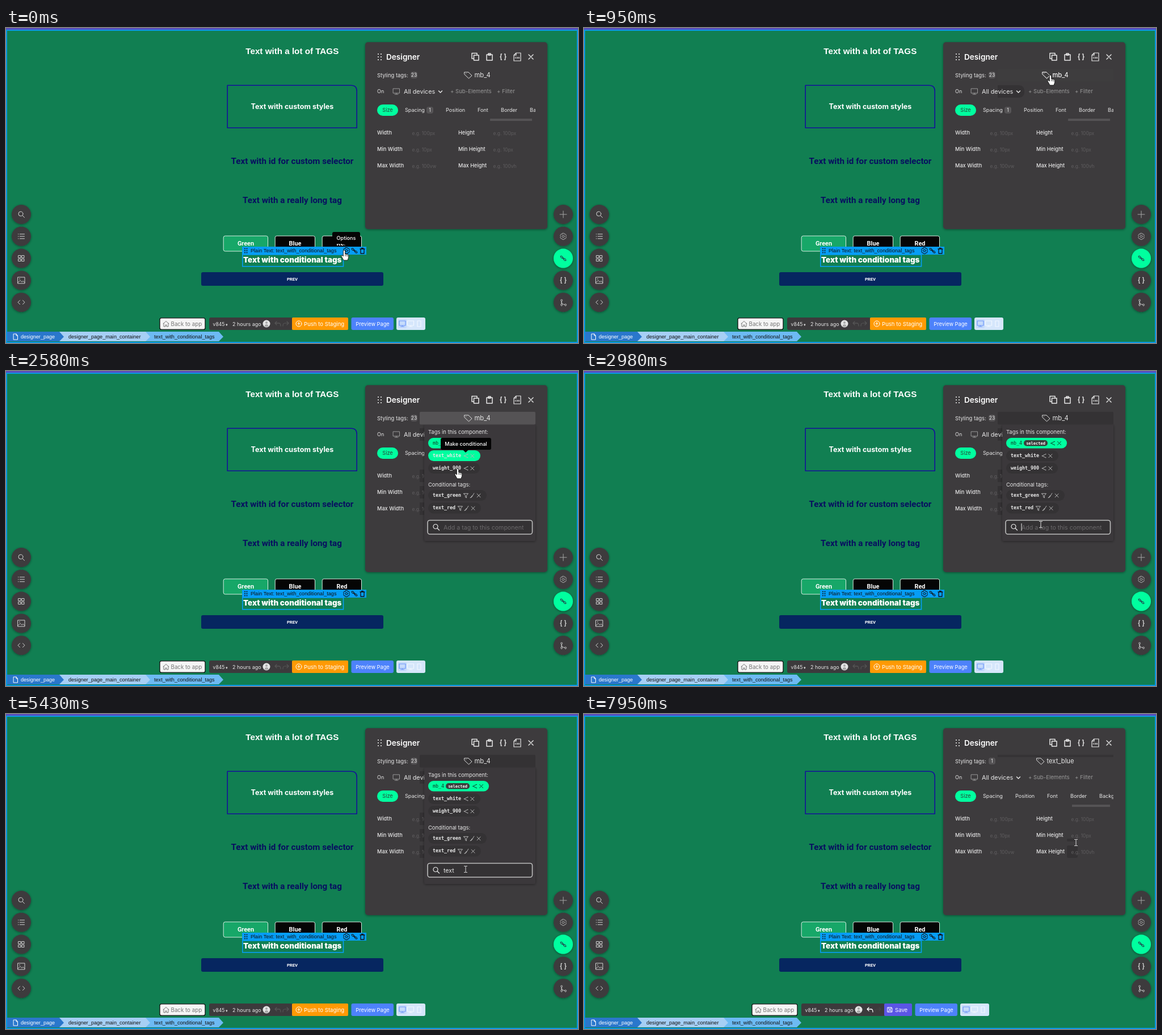
Animation, 1008 px wide and 556 px high, one loop 8 s. Source, as an HTML page:

```html
<!DOCTYPE html>
<html lang="en">
<head>
<meta charset="utf-8">
<style>
  html, body { margin: 0; width: 100%; height: 100%; overflow: hidden; background: #117f52; }
  svg { display: block; }
  text { font-family: Inter, sans-serif; white-space: pre; }
  .arial { font-family: "Liberation Sans", Arial, sans-serif; }
  .roboto { font-family: Roboto, sans-serif; font-weight: 700; }
  .mono { font-family: "DejaVu Sans Mono", monospace; font-weight: 700; }
  .medium { font-weight: 500; }
  .semi { font-weight: 600; }
  .bold { font-weight: 700; }
  .black { font-weight: 900; }
  .mid { text-anchor: middle; }
</style>
</head>
<body>
<svg id="stage" width="1008" height="556" viewBox="0 0 1008 556"></svg>
<script>
const LOOP = 8000;
const ACCENT = '#00ff9f', PANEL = '#3c3a3c', DARK = '#343234', PALE = '#e8e8e8', SELECT = '#069df6', ON_ACCENT = '#0c3b29';

// Markup helpers
const text = (x, y, str, size, fill = '#fff', cls = '') =>
  `<text x="${x}" y="${y}" font-size="${size}" fill="${fill}" class="${cls}">${str}</text>`;
const rect = (x, y, w, h, fill, r = 0, extra = '') =>
  `<rect x="${x}" y="${y}" width="${w}" height="${h}" rx="${r}" fill="${fill}" ${extra}/>`;
const circle = (x, y, r, fill, extra = '') => `<circle cx="${x}" cy="${y}" r="${r}" fill="${fill}" ${extra}/>`;
const line = (x, y, d, color = PALE, w = 1) =>
  `<path transform="translate(${x} ${y})" d="${d}" fill="none" stroke="${color}" stroke-width="${w}" stroke-linejoin="round" stroke-linecap="round"/>`;
const group = (id, ...parts) => `<g id="${id}">${parts.join('')}</g>`;
const dots = (x, y, gap, r, fill) => [0, 1, 2, 3, 4, 5].map(i =>
  circle(x + (i % 2) * gap, y + (i >> 1) * gap, r, fill)).join('');

// Icons, centred on 0,0
const icon = {
  close: 'M-3-3L3 3M3-3L-3 3',
  search: 'M3-1A4 4 0 1 1-5-1A4 4 0 1 1 3-1M2 2L5.5 5.5',
  list: 'M-5.5-4h.5M-2.5-4h8M-5.5 0h.5M-2.5 0h8M-5.5 4h.5M-2.5 4h8',
  grid: 'M-5-5h4v4h-4zM1-5h4v4h-4zM-5 1h4v4h-4zM1 1h4v4h-4z',
  image: 'M-6-5.500H6V5.500H-6zM-6 4L-2 0L1 3L3 1L6 4M-3.500-2.500h1',
  code: 'M-2.500-3.500L-6 0L-2.500 3.500M2.500-3.500L6 0L2.500 3.500',
  plus: 'M-6 0H6M0-6V6',
  gear: 'M-1.500-5.500h3l.6 1.700l1.800-.3l1.500 2.600L4.300 0l1.100 1.500l-1.500 2.600l-1.800-.3l-.6 1.700h-3l-.6-1.700l-1.800.3l-1.500-2.600L-4.300 0l-1.100-1.500l1.500-2.600l1.800.3zM2 0A2 2 0 1 1-2 0A2 2 0 1 1 2 0',
  link: 'M-1 0L-4-1L-5-4L-2-4L0-1zM1 0L4 1L5 4L2 4L0 1zM-2-2L2 2',
  braces: 'M-2.500-5H-3.700V-1.200L-5 0L-3.700 1.200V5H-2.500M2.500-5H3.700V-1.200L5 0L3.700 1.200V5H2.500',
  branch: 'M-3-2V3M-3-2A1.500 1.500 0 1 1-2.900-2M-3 6A1.500 1.500 0 1 1-2.900 6M4 6A1.500 1.500 0 1 1 4.100 6M-3 0Q-2 4 2.500 4',
  trash: 'M-4-3.500H4M-1.500-5h3M-3-3.500V4.500H3V-3.500',
  copy: 'M-2.500-3H6V6H-2.500zM-2.500 3H-6V-6.500H3V-3',
  paste: 'M-5-4H5V6H-5zM-2-6H2V-3H-2z',
  file: 'M-2-7H6V7H-6V-3zM-2-7V-3H-6',
  tag: 'M-6-5H1L7 1L1.500 6L-6-1zM-3.500-2.500h.1',
  screen: 'M-5.500-5H5.500V3H-5.500zM0 3V5M-3 5H3',
  down: 'M-3-1.500L0 1.500L3-1.500',
  share: 'M3-3L-3 0L3 3M-3 0h-.5M3-3h.5M3 3h.5',
  filter: 'M-4-3.500H4L1 0V4L-1 3V0z',
  brush: 'M3-4L0 1M0 1Q-1 4-4 4Q-1 3-1 1z',
  home: 'M-5 0L0-4.500L5 0M-4-1V5H-1V2H1V5H4V-1',
  undo: 'M-2-4L-5-1L-2 2M-5-1H2Q5-1 5 4',
  disk: 'M-4-4H3L4-3V4H-4zM-2-4V-1H2V-4M-2 4V1H2V4',
  up: 'M5 0A5 5 0 1 1-5 0A5 5 0 1 1 5 0M0 2.500V-2M-2 0L0-2L2 0',
  doc: 'M-3.500-5H1L3.500-2V5H-3.500zM1-5V-2H3.500',
};

function page() {
  const button = (x, w, label, fill) =>
    rect(x + .2, 367, w - .7, 27, fill, 3, 'stroke="#d7eee1"') + text(x + w / 2, 384, label, 10.9, '#fff', 'roboto mid');
  const side = (x, icons, active) => icons.map((name, i) => {
    const y = 329 + i * 38.8, color = i === active ? '#234' : name === 'plus' || name === 'gear' ? '#a5a5a5' : '#d4d4d4';
    return circle(x, y, 17, i === active ? ACCENT : PANEL, 'filter="url(#soft)"') +
      line(x, y, icon[name], color, name === 'braces' ? 1.3 : 1);
  }).join('');
  const crumb = (x, end, fill) => `<path d="M${x} 536H${end - 8}L${end} 545L${end - 8} 553H${x}z" fill="${fill}"/>`;
  const navy = '#080f60';
  return rect(0, 0, 1008, 556, '#117f52') +
    rect(1, 4, 1006, 551, 'none', 0, 'stroke="#0b98e6" stroke-width="2"') + rect(0, 0, 1008, 3, '#594fbd') +
    text(504.3, 46, 'Text with a lot of TAGS', 15.2, '#fff', 'arial bold mid') +
    line(390.2, 101.2, 'M0 0H218Q228 0 228 10V75H0z', '#14109a', 1.6) +
    text(504.5, 142.7, 'Text with custom styles', 12.6, '#fff', 'bold mid') +
    text(504.5, 239.5, 'Text with id for custom selector', 15.2, navy, 'roboto mid') +
    text(504.5, 308.5, 'Text with a really long tag', 15.2, navy, 'roboto mid') +
    button(383, 79, 'Green', '#17a768') + button(474, 71, 'Blue', '#050505') + button(557, 70, 'Red', '#050505') +
    rect(344, 431, 321, 24, '#062660', 3) + text(504.5, 446, 'PREV', 7.7, '#fff', 'roboto mid') +
    rect(416.8, 400, 177.7, 20.8, 'none', 0, `stroke="${SELECT}" stroke-width="1.6"`) + rect(416, 386, 219, 14, SELECT) +
    text(504.7, 414, 'Text with conditional tags', 13.4, '#fff', 'black mid') +
    dots(421, 389.5, 3.5, 1, '#111') + text(431, 396, 'Plain Text: text_with_conditional_tags', 9.15, '#111', 'arial') +
    line(600, 393, icon.gear, '#111') + line(614, 393, icon.link, '#111') + line(628, 393.5, icon.trash, '#111', 1.3) +
    side(27, ['search', 'list', 'grid', 'image', 'code']) +
    side(982, ['plus', 'gear', 'link', 'braces', 'branch'], 2) +
    crumb(2, 383, '#6dbaf3') + crumb(2, 254, '#a6cff5') + crumb(2, 102, '#2a77cc') +
    line(17, 545, icon.doc, '#fff') + text(26, 548, 'designer_page', 9.1, '#fff', 'arial') +
    text(110, 548, 'designer_page_main_container', 9.1, '#111', 'arial') +
    text(261, 548, 'text_with_conditional_tags', 9.1, '#111', 'arial');
}

// Bottom bar; "edited" offers saving instead of pushing
function bottomBar(id, x, edited) {
  const action = x + 233, actionWidth = edited ? 49 : 99, preview = action + actionWidth + 5.5, devices = preview + 79.5;
  return group(id,
    rect(x, 511.8, 80, 20.4, '#f5f5f5', 3, 'stroke="#111" stroke-width="1.3"'), line(x + 11, 522, icon.home, '#777'),
    text(x + 19.5, 525.5, 'Back to app', 9.75, '#777'),
    rect(x + 87, 511, 147, 22, PANEL, 3), text(x + 93.5, 525.5, 'v845', 8.7, PALE), line(x + 118, 524, 'M-1-1H1L0 1z', PALE),
    text(x + 128, 525.5, '2 hours ago', 9, PALE),
    circle(x + 188, 522, 6.5, '#e4e4e4'), circle(x + 188, 520, 2, '#a8a8a8'),
    `<path transform="translate(${x + 188} 527)" d="M-3.500-.5Q-3-4 0-4Q3-4 3.500-.5Q0 1.500-3.500-.5" fill="#a8a8a8"/>`,
    line(x + 208, 522, icon.undo, edited ? '#fff' : '#555', 1.3),
    `<g transform="translate(${x + 222} 522) scale(-1 1)">${line(0, 0, icon.undo, edited ? '#444' : '#555', 1.2)}</g>`,
    rect(action, 511, actionWidth, 22, edited ? '#5b55e6' : '#ff9a05', 2),
    line(action + (edited ? 10 : 12), 522, edited ? icon.disk : icon.up, '#fff'),
    text(action + (edited ? 19 : 21), 525.5, edited ? 'Save' : 'Push to Staging', 9.6),
    rect(preview, 511, 74.5, 22, '#4d82fb', 3), text(preview + 37.5, 525.5, 'Preview Page', 9.25, '#fff', 'mid'),
    rect(devices, 511, 51, 22, '#d5e6fb', 3), rect(devices + 3, 514, 15, 16, '#c6dbfb', 2),
    line(devices + 10.5, 522, icon.screen, '#6e97f8', 1.2),
    line(devices + 25, 522, icon.screen, '#f2f7ff', 1.2), line(devices + 40, 522, 'M-3-5H3V5H-3z', '#f2f7ff', 1.2));
}

const tagLabel = (x, name) => line(x, 83, icon.tag, '#ddd') + text(x + 11.5, 87, name, 11.2, PALE);

function panel() {
  const field = (x, y, label, hint) =>
    text(x, y, label, 9.2, PALE, 'medium') + text(x + 61.5, y + .5, hint, 8.4, '#5f5d5f');
  const badge = (x, y, n) => rect(x - 6, y - 6, 12, 12, '#565456', 4) + text(x, y + 3, n, 8.4, PALE, 'mid');
  const tabs = xs => ['Spacing', 'Position', 'Font', 'Border', 'Background'].map((name, i) =>
    text(xs[i], 148, name, 9.1, PALE)).join('');
  return rect(633, 25, 321, 330, PANEL, 5, 'filter="url(#soft)"') +
    dots(656, 46, 5, 1.1, PALE) + text(670, 56, 'Designer', 13.6, '#fff', 'semi') +
    line(827, 51, icon.copy, PALE, 1.5) + line(852, 51, icon.paste, PALE, 1.5) + line(876, 51, icon.braces, PALE, 1.4) +
    line(901, 51, icon.file, PALE, 1.2) + text(901, 54, 'css', 5, PALE, 'mid bold') +
    line(925, 51, 'M-4-4L4 4M4-4L-4 4', PALE, 1.4) +
    text(654, 86.5, 'Styling tags:', 9.35, PALE) + text(654, 115, 'On', 9, PALE) +
    group('hoverPill', `<path d="M729 101H765Q776 101 776 112Q776 123 765 123H729z" fill="${DARK}"/>`) +
    line(688, 112, icon.screen, '#999') + text(701, 116, 'All devices', 10.8, PALE) + line(765.5, 112.5, icon.down, PALE, 1.5) +
    text(783, 115, '+ Sub-Elements', 9.6, '#999') + text(865, 115, '+ Filter', 9.6, '#999') +
    rect(654, 135, 37, 20, ACCENT, 10) + text(672.5, 148, 'Size', 9.2, '#284238', 'mid') +
    group('inputEdges', ...[174, 203, 232].map(y => rect(729, y, 8, 22, DARK))) +
    field(654, 188, 'Width', 'e.g. 100px') + field(797, 188, 'Height', 'e.g. 100px') +
    field(654, 217, 'Min Width', 'e.g. 10px') + field(797, 217, 'Min Height', 'e.g. 10px') +
    group('inputHover', rect(851, 220, 18, 5, DARK, 2), rect(851, 232, 19, 22, DARK, 3)) +
    field(654, 246, 'Max Width', 'e.g. 100vw') + field(797, 246, 'Max Height', 'e.g. 100vh') +
    group('before', badge(719, 83, '23'), tagLabel(814, 'mb_4'), badge(747, 145, '1'),
      `<g clip-path="url(#tabClip)">${tabs([703, 775, 831, 872, 923])}</g>`, rect(853, 160, 74, 4, '#555355')) +
    group('after', badge(719, 83, '1'), tagLabel(804, 'text_blue'), rect(729, 72, 204, 4, '#353335'),
      `<g clip-path="url(#tabClip)">${tabs([703, 760, 816, 857, 908])}</g>`, rect(860, 160, 67, 4, '#555355'));
}

function dropdown() {
  const pill = (y, name, width, icons) => {
    const end = 752 + name.length * 5 + 8.5;
    return rect(744, y - 9.500, width, 19, DARK, 9.5, `id="${name}"`) + text(752, y + 2.3, name, 8.3, PALE, 'mono') +
      icons.map((k, i) => line(end + i * 11.300, y + .3, icon[k], '#b5b5b5')).join('');
  };
  return group('dropdown',
    rect(737, 94, 196, 206, '#3a383a', 3, 'filter="url(#soft)"'),
    text(744, 111, 'Tags in this component:', 9.4, PALE),
    rect(744, 118, 107, 18.5, ACCENT, 9.2), text(752, 130, 'mb_4', 8.3, ON_ACCENT, 'mono').replace('<text', '<text style="font-weight:400"'),
    rect(775, 122, 42, 10.5, '#3a3f3d', 5), text(796, 129.8, 'selected', 7, '#fff', 'mono mid'),
    line(826, 127.5, icon.share, ON_ACCENT), line(837.5, 127.5, icon.close, ON_ACCENT),
    pill(149.5, 'text_white', 92, ['share', 'close']), pill(171.5, 'weight_900', 91, ['share', 'close']),
    text(744, 204, 'Conditional tags:', 9.35, PALE),
    pill(219.5, 'text_green', 103, ['filter', 'brush', 'close']), pill(242, 'text_red', 93, ['filter', 'brush', 'close']),
    rect(743, 263.5, 184.5, 24.5, DARK, 4, 'stroke="#bdbdbd" stroke-width="1.600"'), line(758, 275.5, icon.search, PALE, 1.2),
    text(771, 279.5, 'Add a tag to this component', 10.6, '#6b696b').replace('<text', '<text id="hint"'),
    text(771, 279.5, '', 10.6, PALE).replace('<text', '<text id="typed"'),
    '<rect id="caret" y="269" width="1" height="13" fill="#eee"/>');
}

const tooltip = (id, x, y, w, label, tip) => group(id, rect(x, y, w, 21, '#050505', 3),
  `<path d="M${tip - 5} ${y + 21}h10l-5 5z" fill="#050505"/>`, text(x + w / 2, y + 13.8, label, 9.15, '#fff', 'medium mid'));

document.getElementById('stage').innerHTML =
  `<defs><filter id="soft" x="-20%" y="-20%" width="140%" height="140%"><feDropShadow dx="0" dy="1" stdDeviation="2" flood-opacity=".4"/></filter>
  <clipPath id="tabClip"><rect x="690" y="130" width="243" height="30"/></clipPath></defs>` +
  page() + bottomBar('pushBar', 271, false) + bottomBar('saveBar', 296, true) + panel() + dropdown() +
  group('row', rect(729, 72, 204, 22.5, DARK, 2, 'id="rowFill"'), tagLabel(814, 'mb_4')) +
  tooltip('options', 575, 360, 49, 'Options', 600) + tooltip('conditional', 766, 118, 89, 'Make conditional', 810) +
  group('hand', '<path d="M0 0Q1.700 0 1.700 2V7Q8 7.500 8 10Q8 13 6 18H-1Q-3 14-5 11Q-5.500 9-3.500 9L-1.700 11V2Q-1.700 0 0 0z" fill="#fff" stroke="#111" stroke-width=".9"/><path d="M1.800 11V8M4 11V8.500M6 11.500V9" stroke="#111" stroke-width=".7"/>') +
  group('beam', line(0, 0, 'M-2.500-5.500H-.5L0-5L.5-5.500H2.500M0-5V5M-2.500 5.500H-.5L0 5L.5 5.500H2.500', '#ddd'));

const el = id => document.getElementById(id);
const show = (id, on) => el(id).style.display = on ? '' : 'none';
const within = (t, from, to) => t >= from && t < to;

const pointer = [
  [0, 596, 392], [670, 634, 346], [820, 735, 215], [950, 822, 83], [1080, 821, 76], [2580, 796, 172], [2700, 800, 191],
  [2850, 803, 225], [2980, 805, 271], [3110, 806, 271], [3250, 807, 272], [3380, 809, 273], [3510, 810, 274], [7950, 867, 227],
];
const keyTimes = [4190, 4620, 4750, 4890, 5690, 5840, 5980, 6110, 6250];
const caretOn = [[1760, 2300], [2850, 3900], [4190, 5430], [5690, 6800]];

function draw(t) {
  const open = within(t, 1760, 7370), done = t >= 7370, saved = t >= 7490;
  show('options', t < 140);
  show('conditional', within(t, 2580, 2700));
  show('hoverPill', within(t, 950, 7370));
  show('inputEdges', open);
  show('inputHover', t >= 7950);
  show('before', !done);
  show('after', done);
  show('pushBar', !saved);
  show('saveBar', saved);
  show('dropdown', open);
  show('row', within(t, 950, 7370));
  el('rowFill').setAttribute('fill', t < 2700 ? '#555355' : DARK);
  el('rowFill').setAttribute('opacity', t < 1080 ? .06 : 1);
  el('text_white').setAttribute('fill', within(t, 2580, 2700) ? ACCENT : DARK);
  el('text_green').setAttribute('fill', within(t, 2850, 2980) ? ACCENT : DARK);

  const count = keyTimes.filter(k => k <= t).length;
  const typed = el('typed');
  typed.textContent = 'text blue'.slice(0, count);
  show('hint', !count);
  show('caret', caretOn.some(([a, b]) => within(t, a, b)));
  el('caret').setAttribute('x', 770.5 + (open && count ? typed.getComputedTextLength() : 0));

  const [, x, y] = pointer.filter(p => p[0] <= t).pop();
  show('hand', t < 2980);
  show('beam', t >= 2980);
  for (const id of ['hand', 'beam']) el(id).setAttribute('transform', `translate(${x} ${y})`);
}

let start;
function tick(now) {
  start ??= now;
  draw((now - start) % LOOP);
  requestAnimationFrame(tick);
}
draw(0);
requestAnimationFrame(tick);
</script>
</body>
</html>
```
